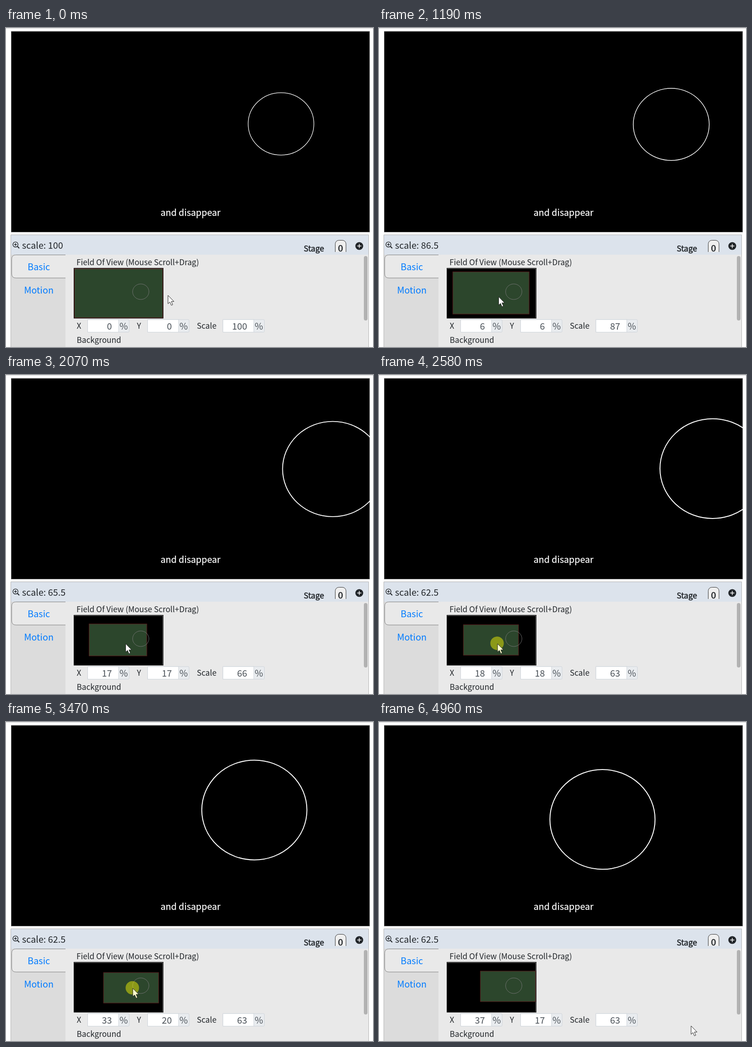
An HTML page that plays this animation: 802 by 698 pixels, repeating every 5.02 s.

```html
<!DOCTYPE html>
<html lang="en">
<head>
<meta charset="utf-8">
<title>Field of view editor</title>
<style>
  html, body { margin: 0; width: 100%; height: 100%; overflow: hidden; background: #fff; }
  svg { display: block; width: 802px; height: 698px; }
  text { font: 17.2px "Noto Sans CJK SC", "Noto Sans CJK JP", "Noto Sans CJK", "Noto Sans", sans-serif; fill: #212529; white-space: pre; }
  .large { font-size: 19.8px; }
  .link { fill: #007bff; text-anchor: middle; }
  .value { fill: #495057; text-anchor: end; }
  .unit { fill: #495057; }
  .strong { stroke: #212529; stroke-width: .55px; }
  .caption { font-size: 19.6px; fill: #fff; stroke: #fff; stroke-width: .25px; text-anchor: middle; }
  .outline { fill: none; stroke: #fff; }
</style>
</head>
<body>
<svg viewBox="0 0 802 698">
  <defs>
    <clipPath id="stageClip"><rect x="12" y="8" width="783" height="439"/></clipPath>
    <clipPath id="headerClip"><rect x="11" y="453" width="782" height="37"/></clipPath>
    <clipPath id="thumbClip"><rect x="149" y="526" width="194.5" height="109"/></clipPath>
  </defs>

  <rect width="802" height="1" fill="#d0d0d0"/>
  <rect x="11.5" y="7.5" width="783" height="439" fill="#000" stroke="#666"/>
  <g clip-path="url(#stageClip)">
    <ellipse id="ring" class="outline"/>
  </g>
  <text class="caption" x="403.2" y="411">and disappear</text>

  <rect x="11" y="453" width="782" height="245" fill="#e9e9e9"/>
  <rect x="11" y="453" width="782" height="43" fill="#dce3ec"/>
  <rect x="11" y="496" width="119" height="202" fill="#dcdcdc"/>
  <path d="M10.5 698V452.5H792.5V698" fill="none" stroke="#b4b4b4"/>

  <g fill="none" stroke="#212529" stroke-width="1.4">
    <circle cx="20.7" cy="473.7" r="5.6"/>
    <path d="M24.8 477.8L29 482" stroke-width="2"/>
    <path d="M17.7 473.7h6M20.7 470.7v6"/>
  </g>
  <text id="scaleLabel" class="large" x="35" y="483"></text>
  <text class="strong" x="650.5" y="488.5">Stage</text>
  <g clip-path="url(#headerClip)">
    <rect x="719.5" y="464.5" width="23.5" height="40" rx="8" fill="#efefef" stroke="#333"/>
    <text class="large strong" x="731" y="488.5" text-anchor="middle">0</text>
  </g>
  <circle cx="772" cy="477" r="8.6" fill="#212529"/>
  <path d="M767.5 477h9M772 472.5v9" stroke="#fff" stroke-width="1.5"/>

  <path d="M130 496.5H21.5Q12.5 496.5 12.5 505.5V538Q12.5 547 21.5 547H130" fill="#e9e9e9" stroke="#808080"/>
  <text class="large link" x="71.7" y="530">Basic</text>
  <text class="large link" x="71.7" y="581">Motion</text>
  <rect x="782" y="499" width="8" height="141" rx="4" fill="#b2b2b2"/>

  <text x="154" y="518.7">Field Of View (Mouse Scroll+Drag)</text>
  <rect x="148" y="525" width="196" height="110.5"/>
  <path d="M149 526.5H342.5V634.5" fill="none" stroke="#999" stroke-width=".8"/>
  <g clip-path="url(#thumbClip)">
    <rect id="view" fill="#2c462c" stroke="#5c1a1c"/>
    <ellipse cx="294.5" cy="577" rx="17.8" ry="17" fill="none" stroke="#777" stroke-width=".9"/>
  </g>

  <g id="fields"></g>
  <text x="154.5" y="689">Background</text>

  <circle id="press" r="14.7" fill="#ff0" fill-opacity=".45"/>
  <path id="cursor" d="M0 0V18.3L4.1 14.6L7.3 21.8L10.3 20.4L7.2 13.4H13Z" stroke="#222" stroke-width="1"/>
</svg>

<script>
const LOOP = 5020;
const STAGE = { x: 12, y: 7, w: 783, h: 440 };
const THUMB = { x: 149.6, y: 527, w: 193, h: 107 };
const RING = { x: 589, y: 202.8, rx: 71.8, ry: 68.2 };

const $ = id => document.getElementById(id);
const setAttrs = (el, attrs) => {
  for (const name in attrs) el.setAttribute(name, attrs[name]);
};

// Wheel notches reached at each moment.
const wheel = [
  [580, 1], [650, 2], [720, 3], [920, 4], [980, 6], [1050, 7], [1190, 9], [1250, 11],
  [1470, 14], [1590, 16], [1810, 18], [1870, 20], [1920, 21], [2070, 23], [2130, 25]
];

// Pointer moves: first change, last change, number of changes, destination.
const pointerMoves = [
  [60, 270, 4, { x: 261.5, y: 588 }],
  [2580, 2580, 1, { x: 259, y: 588 }],
  [2663, 3080, 6, { x: 270.5, y: 587 }],
  [3130, 3610, 8, { x: 281, y: 580 }],
  [3880, 3940, 2, { x: 283, y: 580 }],
  [4010, 4080, 2, { x: 284, y: 580 }],
  [4560, 4960, 6, { x: 682, y: 665 }]
];

// Drags of the view, in percent.
const viewDrags = [
  [2663, 3080, 6, { x: 29.8, y: 24.6 }],
  [3130, 3610, 8, { x: 34.7, y: 16.8 }],
  [3880, 3940, 2, { x: 36, y: 16.8 }],
  [4010, 4080, 2, { x: 37.2, y: 16.8 }]
];

function stair(t, first, last, count) {
  if (t < first) return 0;
  if (t >= last) return 1;
  return (Math.floor((t - first) / (last - first) * (count - 1) + 1e-6) + 1) / count;
}

function follow(t, start, moves) {
  let { x, y } = start;
  for (const [first, last, count, to] of moves) {
    const p = stair(t, first, last, count);
    x += (to.x - x) * p;
    y += (to.y - y) * p;
  }
  return { x, y };
}

function addField(id, label, labelX, boxX) {
  $("fields").insertAdjacentHTML("beforeend", `
    <text x="${labelX}" y="658">${label}</text>
    <rect x="${boxX}" y="638" width="90.5" height="27.5" rx="2" fill="#e9ecef" stroke="#ced4da"/>
    <rect x="${boxX}" y="638" width="67.5" height="27.5" fill="#fff" stroke="#ced4da"/>
    <text id="${id}" class="large value" x="${boxX + 53}" y="660"></text>
    <text class="large unit" x="${boxX + 69.5}" y="660">%</text>`);
  return $(id);
}

const fieldX = addField("fieldX", "X", 154.5, 178.5);
const fieldY = addField("fieldY", "Y", 286, 309.5);
const fieldScale = addField("fieldScale", "Scale", 417, 474);

function draw(t) {
  const notches = wheel.reduce((n, [at, value]) => t >= at ? value : n, 0);
  const scale = 100 - 1.5 * notches;
  const s = scale / 100;
  // The offset trails the zoom by one notch.
  const offset = 0.75 * Math.max(0, notches - 1);
  const view = follow(t, { x: offset, y: offset }, viewDrags);
  const vx = view.x / 100, vy = view.y / 100;

  setAttrs($("ring"), {
    cx: STAGE.x + (RING.x - vx * STAGE.w) / s,
    cy: STAGE.y + (RING.y - vy * STAGE.h) / s,
    rx: RING.rx / s,
    ry: RING.ry / s,
    "stroke-width": 1.25 / s
  });
  setAttrs($("view"), {
    x: THUMB.x + vx * THUMB.w,
    y: THUMB.y + vy * THUMB.h,
    width: THUMB.w * s,
    height: THUMB.h * s
  });

  $("scaleLabel").textContent = "scale: " + scale;
  fieldX.textContent = Math.round(view.x);
  fieldY.textContent = Math.round(view.y);
  fieldScale.textContent = Math.round(scale);

  const pointer = follow(t, { x: 354, y: 585 }, pointerMoves);
  const pressed = t >= 2580 && t < 4560;
  setAttrs($("cursor"), {
    transform: `translate(${pointer.x} ${pointer.y})`,
    fill: pressed ? "#ffffcc" : "#fff"
  });
  setAttrs($("press"), {
    cx: pointer.x - 1,
    cy: pointer.y - 1,
    visibility: pressed ? "visible" : "hidden"
  });
}

const begin = performance.now();
function tick() {
  draw((performance.now() - begin) % LOOP);
  requestAnimationFrame(tick);
}
tick();
</script>
</body>
</html>
```
